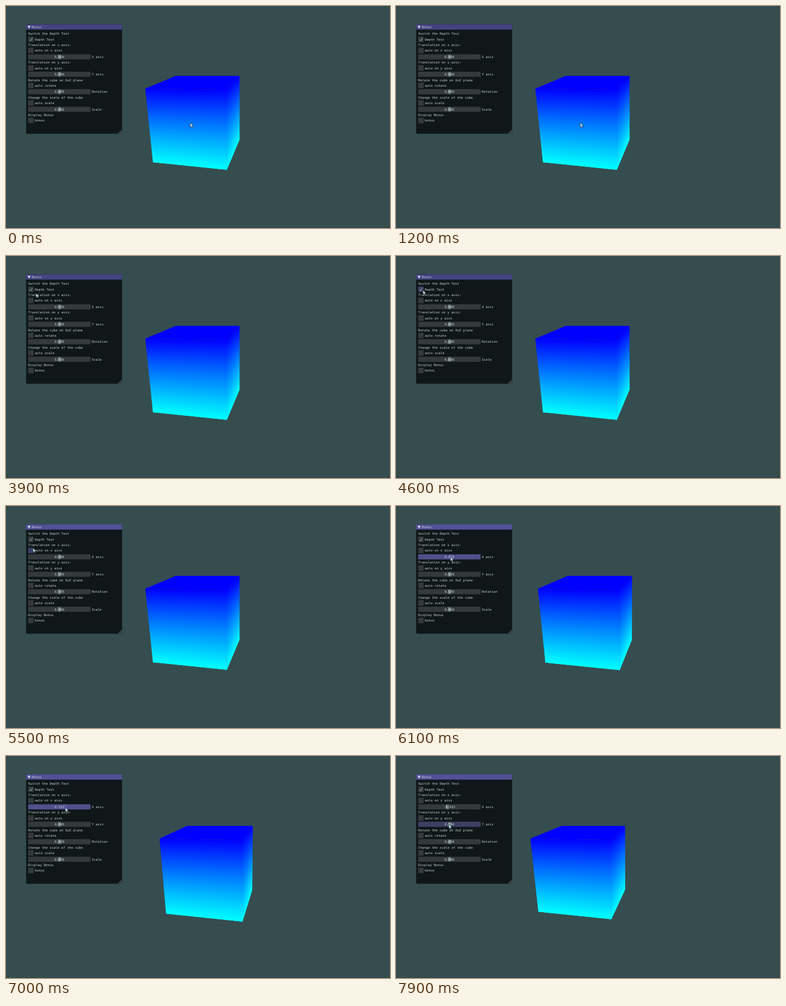
Write an HTML page that moves like this. It is 640 by 371 pixels and loops after 8000 ms.

```html
<!DOCTYPE html>
<html lang="en">
<head>
<meta charset="utf-8">
<title>Cube controls</title>
<style>
  html, body { margin: 0; width: 100%; height: 100%; overflow: hidden; background: #364d4f; }
  svg { display: block; width: 100%; height: 100%; }
  text { font: 5.4px "DejaVu Sans Mono", "Noto Sans Mono", monospace; fill: #c9d3d5; white-space: pre; }
</style>
</head>
<body>
<svg id="stage" viewBox="0 0 640 371"></svg>
<script>
const LOOP = 8000, STEP = 100;
const FRAME = '#343a3c', HOVER = '#3e4064', ACTIVE = '#50508c';
const BANDS = 64;
const stage = document.getElementById('stage');

function add(tag, attrs, text) {
  const el = document.createElementNS('http://www.w3.org/2000/svg', tag);
  for (const k in attrs) el.setAttribute(k, attrs[k]);
  if (text) el.textContent = text;
  stage.appendChild(el);
  return el;
}
const rect = (x, y, width, height, fill) => add('rect', { x, y, width, height, fill });
const label = (x, y, s) => add('text', { x, y: y + 2 }, s);
const mix = (a, b, k) => a + (b - a) * k;
const mixPt = (a, b, k) => [mix(a[0], b[0], k), mix(a[1], b[1], k)];

// Scene
rect(0, 0, 640, 371, '#364d4f');
rect(0, 370, 640, 1, '#2f4446');
const topFace = add('polygon', { fill: '#00f' });
const makeBands = () => Array.from({ length: BANDS }, (_, i) =>
  add('polygon', { fill: `rgb(0,${Math.round(255 * (i + 0.5) / BANDS)},255)` }));
const sideBands = makeBands(), frontBands = makeBands();

// Panel
add('rect', { x: 33.5, y: 30.5, width: 160, height: 183, rx: 2, fill: '#0f1719' });
const title = add('path', { d: 'M33.5 39.5V32.5a2 2 0 0 1 2-2H191.5a2 2 0 0 1 2 2V39.5Z' });
add('path', { d: 'M36 33h5l-2.5 5Z', fill: '#d5d8e4' });
label(43, 35.2, 'Bonus');
add('path', { d: 'M193.3 206.5V213.3H186Z', fill: '#3c4548' });

const widgets = [];
function check(y, name) {
  const box = rect(37, y - 4.6, 9, 9.2, FRAME);
  label(48, y, name);
  widgets.push({ box, x0: 37, x1: 48 + name.length * 3.25, y0: y - 4.8, y1: y + 4.6 });
}
function slider(y, name) {
  const box = rect(37, y - 4.3, 104, 8.6, FRAME);
  const grab = rect(86.5, y - 3.6, 5, 7.2, '#6b7d7f');
  const value = add('text', { x: 89, y: y + 2, 'text-anchor': 'middle' }, '0.000');
  label(143, y, name);
  const w = { box, grab, value, x0: 37, x1: 141, y0: y - 4.5, y1: y + 4.5 };
  widgets.push(w);
  return w;
}

label(37, 46.2, 'Switch the Depth Test');
check(55.7, 'Depth Test');
add('path', { d: 'M39.2 56l1.8 2L44 53.4', fill: 'none', stroke: '#838d8f', 'stroke-width': 1.1 });
label(37, 65.1, 'Translation on x axis:');
check(74.3, 'auto on x aixs');
const xSlider = slider(85, 'X axis');
label(37, 94.3, 'Translation on y axis:');
check(103.6, 'auto on y aixs');
slider(114.1, 'Y axis');
label(37, 123.6, 'Rotate the cube on XoZ plane');
check(132.8, 'auto rotate');
slider(143.3, 'Rotation');
label(37, 152.8, 'Change the scale of the cube');
check(162, 'auto scale');
slider(172.6, 'Scale');
label(37, 182, 'Display Bonus');
check(191.3, 'bonus');

const cursor = add('path', {
  d: 'M0 0V7.4L1.7 5.9L2.9 8.6L4.2 8L3 5.4H5.2Z',
  fill: '#c4e4ec', stroke: '#14242c', 'stroke-width': 0.6
});

// Pointer: time, x, y
const path = [
  [0, 307, 195], [1900, 307, 195], [3400, 130, 105], [3900, 50, 62],
  [4300, 45, 57], [5000, 45, 57], [5500, 45, 70], [5800, 75, 76],
  [6000, 89, 85], [6500, 106.36, 84], [6700, 122.15, 84],
  [7000, 98.88, 86], [7400, 85.56, 86], [7500, 85.56, 86], [7900, 88, 114]
];
function pointer(t) {
  let i = 0;
  while (i < path.length - 2 && t >= path[i + 1][0]) i++;
  const [t0, ...a] = path[i], [t1, ...b] = path[i + 1];
  const k = Math.min(1, (t - t0) / (t1 - t0));
  return mixPt(a, b, k * k * (3 - 2 * k));
}

// Corners at rest, then their drift per unit of x translation
const corners = {
  backL: [282.8, 116.8, 125, 0], backR: [389.2, 116.8, 145, 0],
  topL: [232.3, 138, 156, 0], topR: [366, 140, 180, 1],
  lowL: [245, 261.2, 144, 15.6], lowR: [368, 273.8, 172, 19.5],
  farLow: [389.2, 223.3, 138, 6]
};
// Strips follow the lines of equal height; each overlaps the next
function shade(bands, a, b, c, d) {
  const depth = s => s / (1.08 - 0.08 * s);
  bands.forEach((el, i) => {
    const k0 = depth(i / BANDS), k1 = depth(Math.min(1, (i + 2) / BANDS));
    el.setAttribute('points', [mixPt(a, d, k0), mixPt(b, c, k0), mixPt(b, c, k1), mixPt(a, d, k1)].join(' '));
  });
}
function drawCube(v) {
  const p = {};
  for (const k in corners) {
    const [x, y, dx, dy] = corners[k];
    p[k] = [x + dx * v, y + dy * v];
  }
  topFace.setAttribute('points', [p.backL, p.backR, p.topR, p.topL].join(' '));
  shade(sideBands, p.topR, p.backR, p.farLow, p.lowR);
  shade(frontBands, p.topL, p.topR, p.lowR, p.lowL);
}

function draw(time) {
  const t = Math.floor((time % LOOP) / STEP) * STEP;
  const [x, y] = pointer(t);
  const drag = t >= 6000 && t < 7500;
  const shown = t < 2000 || t >= 3400;
  const v = t < 6000 ? 0 : drag ? Math.round((x - 89) / 65 * 1000) / 1000 : -0.053;

  drawCube(v);
  title.setAttribute('fill', t < 5000 ? '#444482' : '#525298');
  for (const w of widgets) {
    const over = shown && !drag && x >= w.x0 && x <= w.x1 && y >= w.y0 && y <= w.y1;
    w.box.setAttribute('fill', drag && w === xSlider ? ACTIVE : over ? HOVER : FRAME);
  }
  xSlider.grab.setAttribute('x', 86.5 + 65 * v);
  xSlider.grab.setAttribute('fill', drag ? '#5c599e' : '#6b7d7f');
  xSlider.value.textContent = v.toFixed(3);
  cursor.setAttribute('transform', `translate(${x} ${y})`);
  cursor.setAttribute('visibility', shown ? 'visible' : 'hidden');
}

const start = performance.now();
function tick() {
  draw(performance.now() - start);
  requestAnimationFrame(tick);
}
tick();
</script>
</body>
</html>
```
